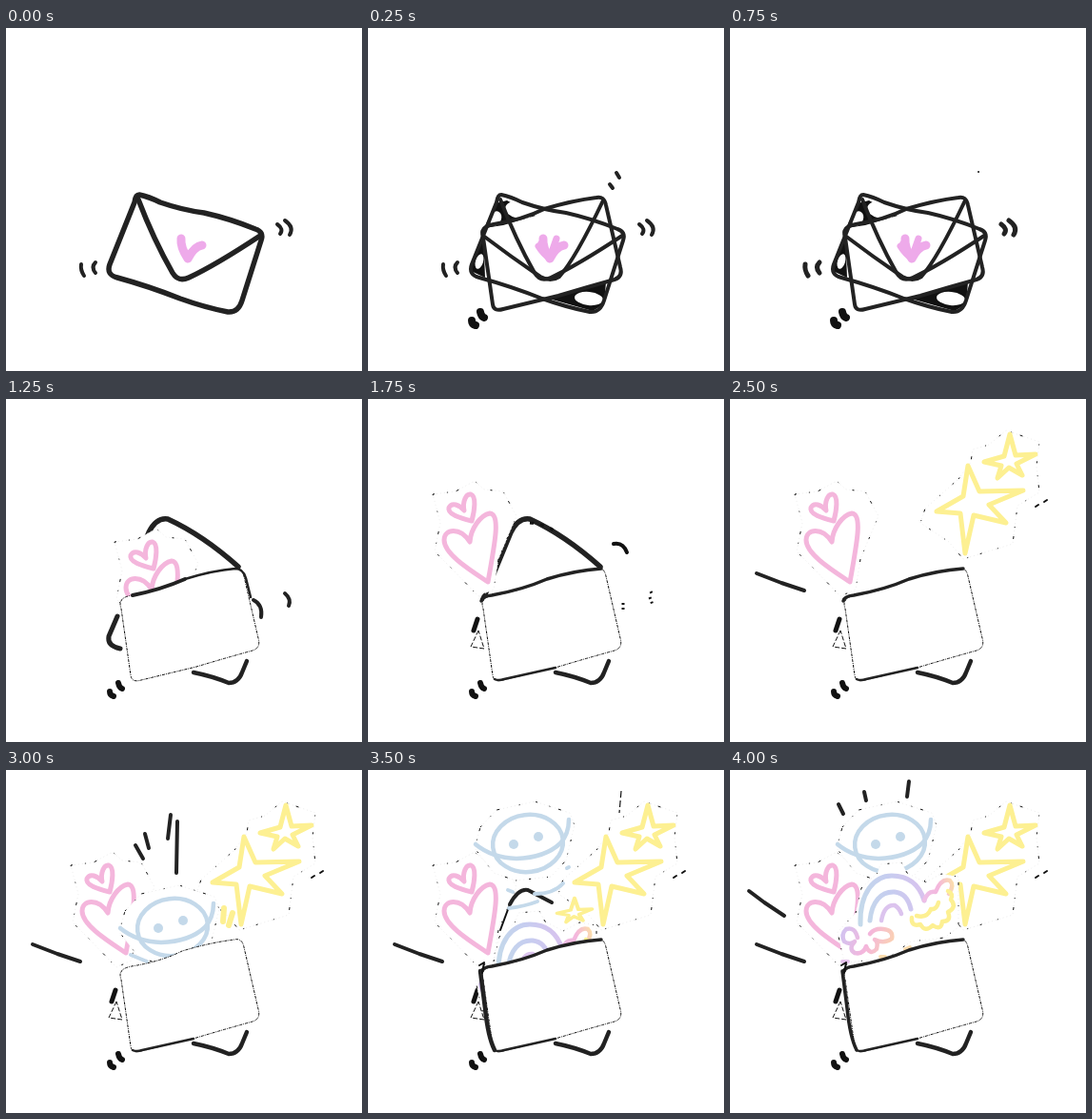
These frames come from a looping animation (374x360 px, 4250 ms). An HTML page with a canvas:

```html
<!DOCTYPE html>
<html lang="en">
<head>
<meta charset="utf-8">
<title>Love letter</title>
<style>
html, body { margin: 0; width: 100%; height: 100%; overflow: hidden; background: #fff; }
canvas { display: block; }
</style>
</head>
<body>
<canvas id="stage" width="374" height="360"></canvas>
<script>
const ctx = document.getElementById('stage').getContext('2d');
const STEP = 250, STEPS = 17;
const INK = '#222', PINK = '#f4b6dc', YELLOW = '#fdf092', BLUE = '#c4d9ea';
ctx.lineJoin = 'round';

function line(d, color = INK, width = 5, dash = []) {
  ctx.strokeStyle = color;
  ctx.lineWidth = width;
  ctx.lineCap = dash.length ? 'butt' : 'round';
  ctx.setLineDash(dash);
  ctx.stroke(new Path2D(d));
}
function fill(d, color) {
  ctx.fillStyle = color;
  ctx.fill(new Path2D(d));
}
function oval(x, y, rx, ry, color, tilt = 0) {
  ctx.fillStyle = color;
  ctx.beginPath();
  ctx.ellipse(x, y, rx, ry, tilt, 0, 7);
  ctx.fill();
}
// Cut-out paper edge: white, faint dots and a few dark flecks
function paper(d) {
  fill(d, '#fff');
  line(d, '#eee', 1, [1, 3]);
  line(d, '#111', 1, [2, 13, 1, 9, 3, 21, 1, 17]);
}
function at([x, y], draw) {
  ctx.save();
  ctx.translate(x, y);
  draw();
  ctx.restore();
}

// Closed envelope, tilted each way
const bodyA = 'M140 175Q150 177 162 183Q185 191 208 194Q235 200 262 211Q271 214 268 223L248 286Q244 299 233 298Q208 293 183 284Q150 271 117 262Q105 259 109 248L135 183Q136 175 140 175Z';
const flapA = 'M139 180Q155 222 175 257Q181 267 192 262Q220 249 267 218';
const bodyB = 'M121 212Q122 208 132 206Q163 201 185 190Q215 181 240 178Q248 176 250 186L265 251Q268 261 259 264Q230 272 200 281L142 295Q132 298 131 290L121 220Q119 214 121 212Z';
const flapB = 'M121 218Q150 240 181 261Q192 267 201 261Q218 242 247 181';
const ticksA = 'M79 248Q78 254 82 260M94 246Q89 251 94 257M285 206Q292 211 288 216M293 202Q303 209 298 217';
const lowTicks = 'M109 307Q109 311 113 312M118 298Q119 303 122 304';
const seal = 'M184 221Q183 230 191 242Q198 229 206 228';

function letterA(w) {
  line(bodyA, INK, w);
  line(flapA, INK, w);
}
function letterB(w) {
  line(bodyB, INK, w);
  line(flapB, INK, w);
}

function wobble(n) {
  if (n === 0) {
    letterA(5.5);
    line(ticksA, INK, 4);
    line(seal, '#eeaaea', 9);
    return;
  }
  fill('M190 284L250 267L248 290L236 297Z', '#111');
  oval(232, 284, 15, 7, '#fff', .1);
  fill('M121 215L123 262L108 255Z', '#111');
  oval(117, 245, 4, 8, '#fff', .3);
  fill('M134 184L122 210L142 207L176 197L146 181Z', '#111');
  oval(159, 191, 15, 9, '#fff', .2);
  oval(134, 200, 6, 8, '#fff', .4);
  letterB(4);
  letterA(4);
  line(ticksA, INK, n === 1 ? 4 : 5);
  line(lowTicks, '#111', 8);
  line(n === 3 ? 'M261 151h.1' : 'M254 164l3 4M261 152l3 5', INK, n === 3 ? 2 : 4);
  line(seal, '#eeaaea', 9);
  line('M182 226L191 241L198 221M179 229Q184 237 191 242', '#eeaaea', 7);
}

function hearts() {
  paper('M68 100L92 97L112 86L122 95L142 97L156 123L150 137L137 168L132 200L116 207L88 178L70 160L76 130Z');
  line('M109 128C97 125 83 121 85 114C88 108 96 111 101 117C99 108 103 99 108 100C114 102 112 117 109 128Z', PINK);
  line('M126 192C108 180 80 163 80 148C80 136 97 134 107 150C108 136 118 122 128 120C139 121 134 148 126 192Z', PINK);
}

const starSmall = 'M294 37L300 59L321 58L301 68L307 80L293 72L281 83L285 70L267 66L288 60Z';
function stars() {
  paper('M240 84L253 66L255 53L272 48L290 33L325 45L322 70L325 98L302 112L297 152L245 168L230 150L200 130L205 115Z');
  line('M250 70L262 97L308 96L272 111L290 130L256 122L247 162L242 120L217 118L245 102Z', YELLOW);
  line(starSmall, YELLOW);
}

function face() {
  paper('M118 60L135 42L175 33L212 45L217 58L208 95L192 112L155 116L132 108L112 82Z');
  ctx.strokeStyle = BLUE;
  ctx.lineWidth = 4.5;
  ctx.setLineDash([]);
  ctx.beginPath();
  ctx.ellipse(168, 77, 37, 30, -.12, 0, 7);
  ctx.stroke();
  line('M113 78Q130 92 156 93Q186 92 202 77Q211 67 211 52', BLUE, 4.5);
  oval(153, 78, 5, 5, BLUE);
  oval(179, 70, 5, 5, BLUE);
}

function blend(x0, y0, x1, y1, ...colors) {
  const g = ctx.createLinearGradient(x0, y0, x1, y1);
  colors.forEach((c, i) => g.addColorStop(i / (colors.length - 1), c));
  return g;
}
function rainbow() {
  paper('M132 150L138 124L155 108L158 99L180 97L186 108L205 118L222 109L240 112L240 165L225 176L190 180L165 198L120 202L113 170Z');
  const sky = blend(137, 150, 207, 135, BLUE, '#c6cdf0', '#d9c2ee');
  line('M137 162C136 128 152 111 170 111C188 111 199 121 204 137', sky);
  line('M147 158C149 138 159 127 173 128C183 129 188 137 190 146', sky);
  line('M159 158C161 147 166 141 173 142Q178 145 180 151', '#dcc4ee', 4.5);
  line('M134 176Q131 164 122 167Q116 173 120 180Q126 184 131 180Q124 188 131 192Q140 194 143 185Q147 195 154 188Q156 180 152 178Q162 183 170 177Q172 168 161 167Q152 166 147 172',
    blend(118, 168, 172, 185, '#d3c3f0', PINK, '#fbd3b0'), 4.5);
  line('M204 137Q208 126 216 128Q222 113 231 116Q236 121 230 130', blend(205, 130, 235, 122, '#eebfe6', PINK, '#fbdcae'), 4.5);
  line('M191 155Q190 165 200 162Q205 171 213 163Q222 169 223 159Q233 159 229 149Q239 144 232 136Q235 130 229 127M196 153Q207 156 211 146Q217 147 219 139',
    YELLOW, 4.5);
}

// Places per step: the last one holds
const cards = [
  { draw: hearts, from: 5, path: [[46, 50], [23, 26], [0, 0]] },
  { draw: stars, from: 8, path: [[-68, 95], [-30, 42], [0, 0]] },
  { draw: face, from: 11, path: [[9, 122], [7, 88], [0, 0]] },
  { draw: rainbow, from: 14, path: [[0, 51], [0, 24], [0, 0]] }
];

const side = 'M28 183L54 193L78 201';
const rays = {
  6: side, 8: 'M299 81L277 103L252 132', 9: side, 10: side,
  11: side + 'M173 46L170 72',
  12: side + 'M173 47L170 72M180 54L179 108M136 79L144 93M146 67L150 82',
  13: side, 14: side, 15: side,
  16: side + 'M20 127L36 139L57 153M114 36L119 46M141 23L143 32M188 12L186 28'
};

const pocketTop = 'M119 212Q120 207 130 206Q163 200 188 189Q217 180 245 178';
const pocketLeft = 'M118 211L123 250Q126 280 133 294';
const pocketBase = 'M133 294Q137 296 143 294L197 282';

function pocket(n) {
  fill(bodyB, '#fff');
  line(bodyB, '#111', 1, [3, 1, 1, 1]);
  if (n === 4) return line(bodyB, INK, 4.5);
  if (n === 5) {
    line('M133 206Q163 200 188 189', INK, 4);
    line('M188 189Q217 180 241 178Q249 178 252 188L257 208', INK, 2.5);
    return;
  }
  if (n !== 12) line(pocketTop, INK, 3.5);
  if (n >= 13) line(pocketLeft, INK, n === 14 ? 4.5 : 3.5);
  line(pocketBase, INK, 2.5);
}

function opened(n) {
  line('M197 287Q217 291 234 298Q244 298 248 287L253 275', INK, 4.5);
  if (n < 6) {
    line('M117 228L108 249Q106 259 120 262', INK, 5);
    line('M260 211Q270 216 268 229M293 204Q300 210 297 217', INK, 4);
  } else {
    line('M115 231L111 243', '#111', 5);
    line('M116 243L108 260L122 262Z', '#111', 1, [5, 2]);
    if (n < 10) line('M268 214v8M297 202l2 4M296 208l3 8', '#111', 3, [2, 3]);
  }
  line(lowTicks, '#111', 6);
  if (n === 4) line(ticksA, INK, 3);
  if (n < 8) line('M121 210L150 140Q158 124 170 126Q207 143 244 176', INK, 5.5);
  if (n === 7 || n === 8) {
    line('M258 152Q268 150 272 161', '#111', 4);
    line('M170 130Q188 131 199 141', '#111', 3, [4, 7]);
  }
  if (rays[n]) line(rays[n], INK, 4);
  if (n === 14 || n === 15) line('M266 22L264 45', '#111', 1.2, [7, 3]);

  for (const { draw, from, path } of cards) {
    if (n >= from) at(path[Math.min(n - from, path.length - 1)], draw);
  }
  if (n >= 10) line('M321 113l3 -2M330 108l3 -2', '#111', 2);
  if (n === 8) {
    line('M150 181Q151 151 165 148Q176 154 163 184', PINK);
    line('M132 196Q138 163 153 142', '#111', 1);
  }
  if (n === 12) {
    line('M229 145L228 159M238 150L234 163', YELLOW, 6);
    line('M131 194L148 201', BLUE, 4);
  }
  if (n === 14) {
    line('M139 168L149 141', '#111', 2);
    line('M149 141Q158 124 168 126L193 139', INK, 4);
    line('M147 126l5 2M175 130Q195 130 205 119M209 103l2 -1M148 145Q165 143 178 138', BLUE, 4);
    ctx.save();
    ctx.translate(217, 147);
    ctx.scale(.68, .55);
    ctx.translate(-294, -60);
    line(starSmall, YELLOW, 6);
    ctx.restore();
  }
  if (n === 16) {
    line('M118 201h6', '#e6c3ec', 4);
    line('M158 196h5M184 188l5 -2', '#fbdcae', 4);
  }
  pocket(n);
  if (n > 13) line('M117 205L122 202L120 213', '#111', 2);
}

function frame() {
  const n = Math.floor(performance.now() / STEP) % STEPS;
  ctx.fillStyle = '#fff';
  ctx.fillRect(0, 0, 374, 360);
  if (n < 4) wobble(n);
  else opened(n);
  requestAnimationFrame(frame);
}
frame();
</script>
</body>
</html>
```
